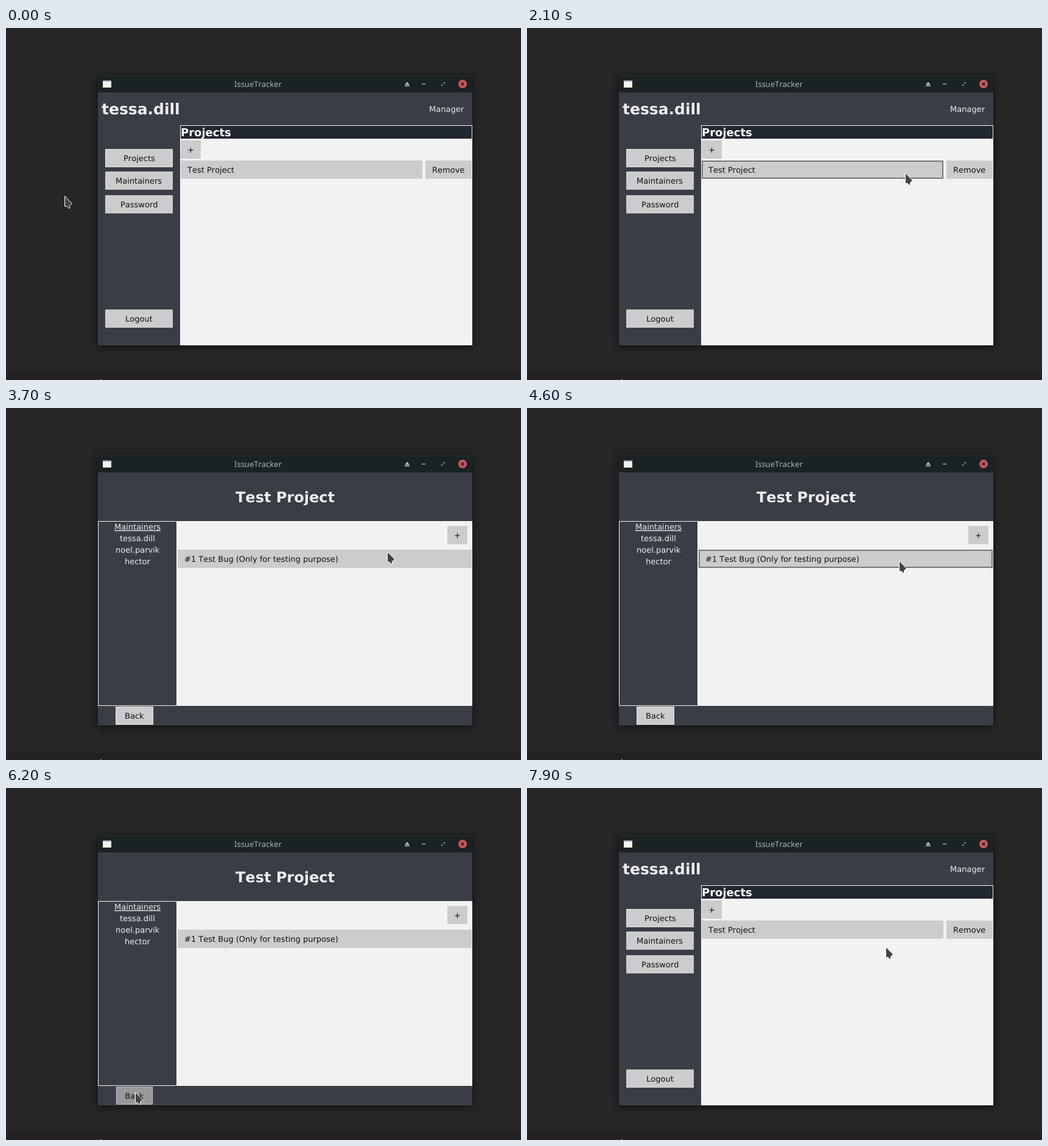
These frames come from a looping animation (846x579 px, 8000 ms). An HTML page:

```html
<!DOCTYPE html>
<html lang="en">
<head>
<meta charset="utf-8">
<title>IssueTracker</title>
<style>
html, body { margin: 0; width: 100%; height: 100%; overflow: hidden; background: #262626; }
svg { display: block; width: 846px; height: 579px; }
text {
  font: 13px "DejaVu Sans", sans-serif; font-kerning: none;
  text-rendering: geometricPrecision; fill: #eee;
}
.bold { font-weight: bold; }
.window { filter: drop-shadow(0 2px 6px #0009); }
.button { transform-box: fill-box; transform-origin: center; }
.button text { fill: #111; }
.face { fill: #ccc; }
.ring, .dots { fill: none; visibility: hidden; }
.ring { stroke: #777; stroke-width: 2; }
.dots { stroke: #fff; stroke-dasharray: 1 1; }
.hover .ring, .focus .dots { visibility: inherit; }
.hover .dots { visibility: hidden; }
.press { transform: scale(.97); }
.press .face { fill: #999; }
</style>
</head>
<body>
<svg viewBox="0 0 846 579">
  <rect width="846" height="579" fill="#262626"/>
  <path d="M843.5 0V569" stroke="#202020" stroke-dasharray="2 2"/>
  <path d="M0 569.5H846" stroke="#1b1b1b"/>
  <rect y="570" width="846" height="9" fill="#242122"/>
  <rect x="155" y="578" width="2" height="1" fill="#ccc"/>

  <rect class="window" x="151" y="78" width="615" height="444" fill="#393e46"/>
  <rect x="151" y="78" width="615" height="28" fill="#1b2224"/>
  <path d="M151 78.5H766" stroke="#2b3435"/>
  <rect x="159" y="86" width="14" height="12" fill="#f2f2ee"/>
  <path d="M159 87H173" stroke="#8e9bb5" stroke-width="2"/>
  <text x="375" y="97" style="font-family:'Noto Sans',sans-serif;fill:#a9b3b9">IssueTracker</text>
  <path d="M655 93.5L659 88.5L663 93.5ZM655 94.5H663V96H655Z" fill="#a9c8c0"/>
  <path d="M683 91.5H689V93H683Z" fill="#a3b0b0"/>
  <path d="M717.5 89H721V92.5ZM715 91.5V95H718.5Z" fill="#87918f"/>
  <circle cx="750" cy="92" r="7" fill="#cc575d"/>
  <path d="M747.5 89.5L752.5 94.5M752.5 89.5L747.5 94.5" stroke="#1b2224" stroke-width="1.7"/>

  <g id="home">
    <text class="bold" x="157" y="142" style="font-size:25px">tessa.dill</text>
    <text x="695" y="138">Manager</text>
    <rect x="286" y="160" width="480" height="362" fill="#f2f2f2"/>
    <rect x="286.5" y="160.5" width="479" height="22" fill="#222831" stroke="#f2f2f2"/>
    <text class="bold" x="287" y="178" style="font-size:18px;fill:#fff">Projects</text>
  </g>

  <g id="project">
    <text class="bold" x="377" y="155" style="font-size:24px">Test Project</text>
    <rect x="280" y="186" width="486" height="304" fill="#f2f2f2"/>
    <rect x="151.5" y="186.5" width="129" height="303" fill="#393e46" stroke="#f2f2f2"/>
  </g>

  <path id="cursor" d="M.5 .5V17.5H4L7 20.5H8.5V16.5L12.5 12.8Z" fill="#444" stroke="#fff" stroke-linejoin="round"/>
</svg>
<script>
const $ = id => document.getElementById(id);

function add(parent, tag, attrs) {
  const el = document.createElementNS('http://www.w3.org/2000/svg', tag);
  for (const name in attrs) el.setAttribute(name, attrs[name]);
  parent.append(el);
  return el;
}

// Centred text starts on a whole pixel
function addCentred(parent, mid, y, label) {
  const el = add(parent, 'text', { y });
  el.textContent = label;
  el.setAttribute('x', Math.round(mid - el.getComputedTextLength() / 2));
  return el;
}

const buttons = [];

function addButton(page, x, y, width, label, left) {
  const height = 30, el = add($(page), 'g', {});
  ['face', 'dots', 'ring'].forEach((name, i) => {
    const d = i / 2;
    add(el, 'rect', { class: name, x: x + d, y: y + d, width: width - 2 * d, height: height - 2 * d });
  });
  const text = addCentred(el, x + width / 2, y + 20, label);
  if (left) text.setAttribute('x', x + 11);
  const contains = (px, py) => px >= x && px < x + width && py >= y && py < y + height;
  const button = { el, page, contains };
  buttons.push(button);
  return button;
}

const projects = addButton('home', 163, 199, 111, 'Projects');
addButton('home', 163, 236, 111, 'Maintainers');
addButton('home', 163, 275, 111, 'Password');
addButton('home', 163, 463, 111, 'Logout');
addButton('home', 287, 185, 33, '+');
const row = addButton('home', 287, 218, 397, 'Test Project', true);
addButton('home', 689, 218, 76, 'Remove');
addButton('project', 725, 194, 33, '+');
addButton('project', 282, 233, 483, '#1 Test Bug (Only for testing purpose)', true);
const back = addButton('project', 180, 491, 62, 'Back');

['Maintainers', 'tessa.dill', 'noel.parvik', 'hector'].forEach((name, i) => {
  const el = addCentred($('project'), 216, 200 + 19 * i, name);
  if (i == 0) el.setAttribute('text-decoration', 'underline');
});

const smooth = s => s * s * (3 - 2 * s);
const slowDown = s => 1 - (1 - s) ** 1.7;

// Each move runs to a resting point; bow bends it into an S
const home = { x: 96, y: 276 };
const moves = [
  { from: 500, to: 1300, x: 528, y: 264, ease: slowDown, bow: -15 },
  { from: 1500, to: 2200, x: 626, y: 236, ease: smooth, bow: 0 },
  { from: 4500, to: 5300, x: 271, y: 434, ease: smooth, bow: 25 },
  { from: 5400, to: 5800, x: 212, y: 500, ease: slowDown, bow: 0 },
  { from: 7300, to: 7900, x: 589, y: 261, ease: smooth, bow: 0 }
];

function pointerAt(t) {
  let { x, y } = home;
  for (const m of moves) {
    if (t <= m.from) break;
    const k = m.ease(Math.min(1, (t - m.from) / (m.to - m.from)));
    x += (m.x - x) * k;
    y += (m.y - y) * k + m.bow * Math.sin(2 * Math.PI * k);
  }
  return [Math.round(x), Math.round(y)];
}

function draw(t) {
  const page = t >= 3700 && t < 6500 ? 'project' : 'home';
  for (const id of ['home', 'project']) $(id).style.visibility = id == page ? 'visible' : 'hidden';
  const [x, y] = pointerAt(t);
  $('cursor').setAttribute('transform', `translate(${x} ${y})`);
  const pressed = t >= 3500 && t < 3700 ? row : t >= 6200 && t < 6500 ? back : null;
  const focused = pressed || (page == 'home' ? projects : back);
  const opening = t >= 3700 && t < 3800;
  for (const b of buttons) {
    const hover = b.page == page && b != pressed && !opening && b.contains(x, y);
    b.el.setAttribute('class', 'button' + (hover ? ' hover' : '') +
      (b == focused ? ' focus' : '') + (b == pressed ? ' press' : ''));
  }
}

const start = performance.now();
function tick() {
  const t = (performance.now() - start) % 8000;
  draw(Math.floor(t / 100) * 100);
  requestAnimationFrame(tick);
}
tick();
</script>
</body>
</html>
```
